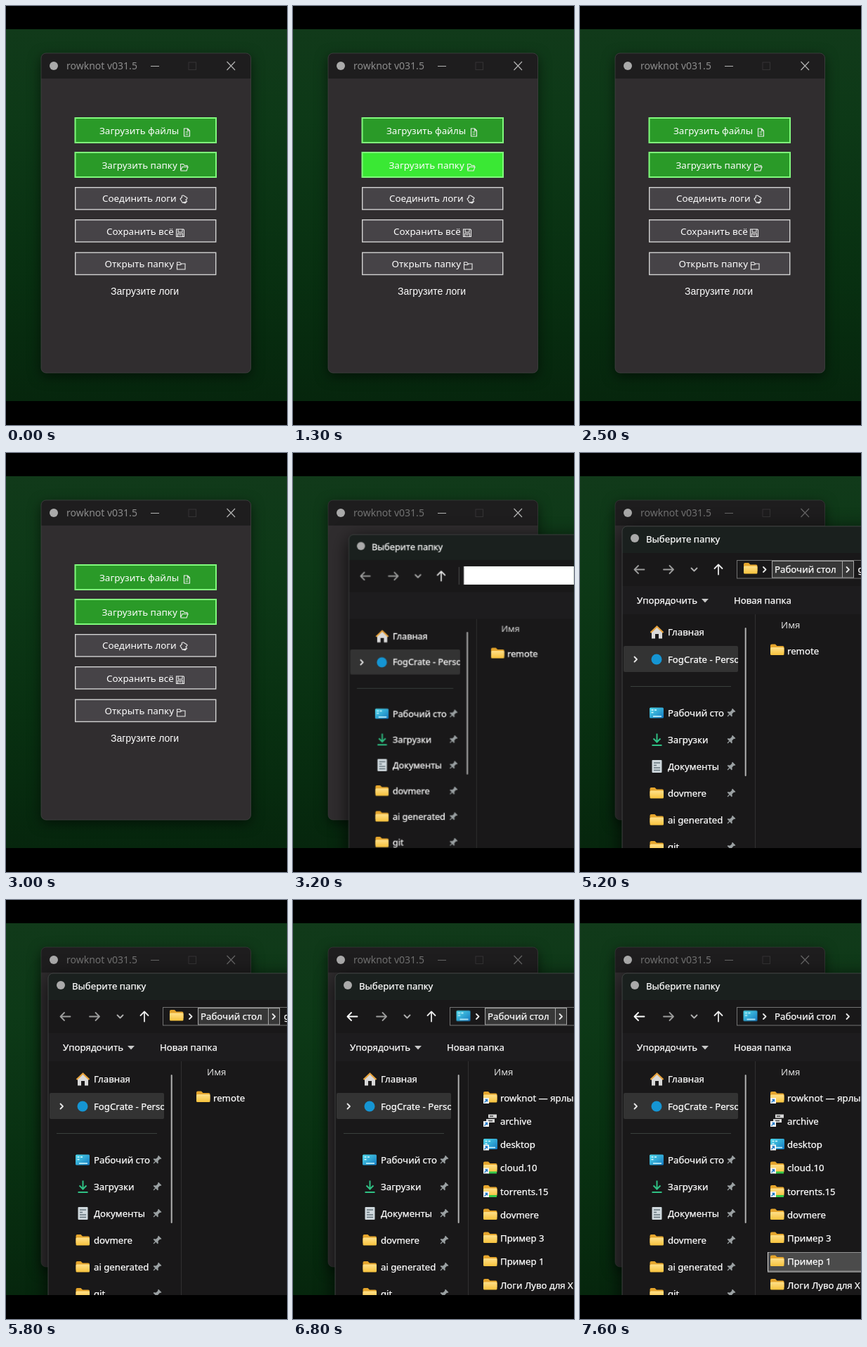
An HTML page for the animation above (8 s loop, 400 by 595 pixels).

```html
<!DOCTYPE html>
<html lang="ru">
<head>
<meta charset="utf-8">
<title>Выбор папки</title>
<style>
html, body { margin: 0; width: 100%; height: 100%; overflow: hidden; background: #000; }
svg { display: block; }
.stage { width: 400px; height: 595px; }
text { font: 13.2px "Noto Sans", "Open Sans", sans-serif; fill: #fff; white-space: pre; }
.dialog text { stroke: #fff; stroke-width: .25; }
.title { font-size: 14px; fill: #8c8c8c; }
.button text { font-size: 13.4px; fill: #fff; }
.status { font: 14px "Liberation Sans", Arial, sans-serif; fill: #fff; }
.line { fill: none; stroke: #ececec; stroke-width: 1.1; }
.arrow { fill: none; stroke: #e8e8e8; stroke-width: 1.8; stroke-linecap: round; stroke-linejoin: round; }
.green { fill: #2a9a28; stroke: #80fb7c; stroke-width: 2; }
.gray { fill: #464347; stroke: #d2d2d2; stroke-width: 1.4; }
.window-shadow { filter: drop-shadow(0 5px 9px rgba(0,0,0,.55)); }
.dialog-shadow { filter: drop-shadow(0 6px 14px rgba(0,0,0,.8)); }

.timed { animation: 8s step-end infinite; }
.dialog { transform-origin: 545px 397px; animation-name: open; }
.title { animation-name: title; }
.frame { animation-name: frame; }
.controls { animation-name: controls; }
.files { animation-name: files; }
.folder { animation-name: folder; }
.loading { animation-name: loading; }
.loaded { animation-name: loaded; }
.header { animation-name: header; }
.crumb { animation-name: crumb; }
.before { animation-name: before; }
.after { animation-name: after; }
.back { animation-name: back; }
.row { animation-name: row; }

@keyframes title { 0% { fill: #8c8c8c } 40% { fill: #727272 } }
@keyframes frame { 0% { stroke-opacity: .75 } 40% { stroke-opacity: .5 } }
@keyframes controls { 0% { stroke: #b4b4b4 } 65% { stroke: #666 } }
@keyframes files { 0% { fill: #2a9a28 } 7.5% { fill: #3ae834 } 13.75% { fill: #2a9a28 } }
@keyframes folder { 0% { fill: #2a9a28 } 13.75% { fill: #3ae834 } 25% { fill: #2a9a28 } }
@keyframes open {
  0% { opacity: 0; transform: scale(.96) }
  40% { opacity: 1; transform: scale(.96) }
  41.25% { opacity: 1; transform: none }
}
@keyframes loading { 0% { opacity: 1 } 42.5% { opacity: 0 } }
@keyframes loaded { 0% { opacity: 0 } 42.5% { opacity: 1 } }
@keyframes header { 0% { opacity: 0 } 48.75% { opacity: 1 } 53.75% { opacity: 0 } }
@keyframes crumb { 0% { opacity: 0 } 55% { opacity: 1 } 90% { opacity: 0 } }
@keyframes before { 0% { opacity: 1 } 80% { opacity: 0 } }
@keyframes after { 0% { opacity: 0 } 80% { opacity: 1 } }
@keyframes back { 0% { stroke: #9c9c9c } 80% { stroke: #fff } }
@keyframes row {
  0% { opacity: 0; transform: none }
  91.25% { opacity: 1; transform: none }
  92.5% { opacity: 1; transform: translateY(66.4px) }
  93.75% { opacity: 1; transform: translateY(166px) }
  95% { opacity: 1; transform: translateY(232.5px) }
}
</style>
</head>
<body>
<svg class="stage" viewBox="0 0 400 595">
  <defs>
    <linearGradient id="wall" x1="0" y1="0" x2="0" y2="1">
      <stop offset="0" stop-color="#113a1a"/>
      <stop offset=".25" stop-color="#0d3917"/>
      <stop offset=".65" stop-color="#083011"/>
      <stop offset="1" stop-color="#06260d"/>
    </linearGradient>
    <linearGradient id="yellow" x1="0" y1="0" x2="0" y2="1">
      <stop offset="0" stop-color="#ffe08a"/>
      <stop offset="1" stop-color="#f7c23c"/>
    </linearGradient>
    <linearGradient id="blue" x1="0" y1="0" x2="1" y2="1">
      <stop offset="0" stop-color="#4fd8ea"/>
      <stop offset="1" stop-color="#1478c0"/>
    </linearGradient>
    <clipPath id="view"><rect y="33" width="400" height="528"/></clipPath>
    <clipPath id="cloudClip"><rect x="120" y="276" width="105" height="34"/></clipPath>
    <clipPath id="deskClip"><rect x="120" y="354" width="85" height="30"/></clipPath>

    <!-- icons are centred on their own origin -->
    <g id="dir">
      <path d="M-10-6q0-2 2-2h5l2.500 2.500H7.500q2 0 2 2V4H-10z" fill="#e5a52c"/>
      <rect x="-10" y="-3.500" width="19.500" height="11" rx="1.500" fill="url(#yellow)"/>
    </g>
    <g id="desktop">
      <rect x="-10" y="-7.500" width="20" height="15" rx="1.500" fill="url(#blue)"/>
      <path d="M-7.500-4h3M-7.500-.5h3M-3-4h3M-5 5H7" stroke="#d5faff" stroke-width="1.700"/>
    </g>
    <g id="shortcut">
      <rect x="-10" y="1" width="8" height="8" fill="#f5f5f5"/>
      <path d="M-8.500 7.500l4-4m-3 0h3v3" fill="none" stroke="#1676c6" stroke-width="1.300"/>
    </g>
    <g id="greenDir">
      <use href="#dir"/><path d="M-3 7.500H9" stroke="#35c94b" stroke-width="3"/><use href="#shortcut"/>
    </g>
    <g id="pin" transform="rotate(45)">
      <path d="M-3-6h6v1.500l-1 .8V0l2.500 2v1.200h-9V2L-2 0v-3.700l-1-.8z" fill="#9aa0a2"/>
      <path d="M0 3v4" stroke="#9aa0a2" stroke-width="1.300"/>
    </g>
    <path id="chevron" class="arrow" d="M-2-3.500L1.500 0L-2 3.500"/>
    <path id="left" d="M7 0H-7m5.500-5.500L-7 0l5.500 5.500"/>
  </defs>

  <rect width="400" height="595"/>
  <g clip-path="url(#view)">
    <rect y="33" width="400" height="528" fill="url(#wall)"/>

    <!-- main window -->
    <rect class="window-shadow" x="50" y="67" width="298.500" height="454" rx="7" fill="#302d2f"/>
    <path d="M50 103V74q0-7 7-7h284.500q7 0 7 7v29z" fill="#1e1d1e"/>
    <rect class="timed frame" x="50" y="67" width="298.500" height="454" rx="7" fill="none" stroke="#454545"/>
    <circle cx="68" cy="85" r="6" fill="#aaa"/>
    <text class="timed title" x="86" y="90">rowknot v031.5</text>
    <path class="timed controls" d="M206 85.500h12M314.500 79l11.500 12m0-12l-11.500 12" fill="none" stroke-width="1.200"/>
    <rect x="260" y="80" width="10.500" height="10.500" fill="none" stroke="#343334"/>

    <g class="button">
      <rect class="green timed files" x="98.500" y="159" width="200.500" height="35"/>
      <text x="133" y="182">Загрузить файлы</text>
      <path class="line" d="M253.500 174h5l3 3v8h-8zM255.500 179h4m-4 3h4M258.500 174v3h3"/>

      <rect class="green timed folder" x="98.500" y="208" width="200.500" height="35"/>
      <text x="136.500" y="231">Загрузить папку</text>
      <path class="line" d="M248.500 233.500v-9h4l1.500 2h4v2M248.500 233.500l2.500-5h8l-2 5.500h-8.500"/>

      <rect class="gray" x="98.700" y="257.700" width="200" height="31.300"/>
      <text x="137" y="278">Соединить логи</text>
      <path class="line" d="M248 274l2.500-2.500q-1-3 2-2.500l2.500 1.500 3 2q0 2-2 2.500l1.500 2.500-2.500 2.500-2-1.500q-2 2-2.500-.5zM253 280l3-2.500"/>

      <rect class="gray" x="98.700" y="303.700" width="200" height="31.300"/>
      <text x="143" y="325">Сохранить всё</text>
      <path class="line" d="M242.500 317h10l1 1v9.500h-11zM245 317v4h6v-4M244.500 327v-4h7v4M246 325h4"/>

      <rect class="gray" x="98.700" y="350.200" width="200" height="31.300"/>
      <text x="140.500" y="371">Открыть папку</text>
      <path class="line" d="M243.500 374v-10h4l1.500 2h6v8zM243.500 367.500h5l1.500-1.500"/>
    </g>
    <text class="status" x="149" y="409.500">Загрузите логи</text>

    <!-- folder picker -->
    <g class="timed dialog">
      <rect class="dialog-shadow" x="60" y="104" width="970" height="590" rx="7" fill="#191819"/>
      <path d="M60 142v-31q0-7 7-7h960v38z" fill="#1a201e"/>
      <path d="M60 189h960v40H60z" fill="#1d1c1e"/>
      <rect x="60" y="104" width="970" height="590" rx="7" fill="none" stroke="#4a4d4b" stroke-opacity=".8"/>
      <circle cx="78" cy="121" r="6" fill="#aaa"/>
      <text x="94" y="127">Выберите папку</text>

      <g transform="translate(84.500 165.500)"><use href="#left" class="arrow timed back"/></g>
      <use href="#left" class="arrow" style="stroke:#9c9c9c" transform="translate(126 165.500) scale(-1 1)"/>
      <path class="arrow" style="stroke:#b0b0b0" d="M158.500 163.500l4 4 4-4"/>
      <use href="#left" class="arrow" transform="translate(197 165.500) rotate(90)"/>

      <g class="timed loading">
        <path d="M223.500 152v26" stroke="#4a4a4a"/>
        <rect x="230.500" y="151" width="780" height="27" fill="#fff"/>
      </g>
      <g class="timed loaded">
        <rect x="223.500" y="152.500" width="780" height="25.500" fill="#191819" stroke="#737373"/>
        <g class="timed crumb">
          <rect x="273.500" y="153.500" width="116" height="23.500" fill="#373737" stroke="#a5a5a5"/>
          <path d="M373.500 153.500V177" stroke="#a5a5a5"/>
        </g>
        <g class="timed before">
          <use href="#dir" x="243" y="164"/>
          <text x="395.500" y="170">git</text>
        </g>
        <use class="timed after" href="#desktop" x="242.500" y="164.500"/>
        <use href="#chevron" x="263" y="165.500"/>
        <text x="277" y="170">Рабочий стол</text>
        <use href="#chevron" x="381.500" y="165.500"/>
        <text x="81" y="214">Упорядочить</text>
        <path d="M173 207h10l-5 5.500z" fill="#c8c8c8"/>
        <text x="219" y="214">Новая папка</text>
      </g>

      <!-- sidebar -->
      <rect x="62" y="274" width="163" height="37" rx="2" fill="#333"/>
      <path d="M72 331.500h143" stroke="#3a403d"/>
      <path d="M249.500 229v400" stroke="#303030"/>
      <path d="M235.700 249v209" stroke="#b2b2b2" stroke-width="2" stroke-linecap="round"/>
      <path d="M102 253v10.500h5V257h5v6.500h5V253l-7.500-6.500z" fill="#d9d9d9"/>
      <path d="M100.500 255l9-8.500 9 8.500" fill="none" stroke="#e8a33c" stroke-width="2.200"/>
      <text x="125" y="259">Главная</text>
      <use href="#chevron" x="79.500" y="293"/>
      <circle cx="109" cy="293" r="7.500" fill="#1595d3"/>
      <text x="125" y="297.500" clip-path="url(#cloudClip)">FogCrate - Personal</text>

      <use href="#desktop" x="109" y="369"/>
      <text x="125" y="374" clip-path="url(#deskClip)">Рабочий стол</text>
      <path d="M109.500 398.500v12m-5-5l5 5 5-5M102.500 415h14" fill="none" stroke="#2fc084" stroke-width="2"/>
      <text x="125" y="412">Загрузки</text>
      <rect x="102.500" y="436" width="14" height="18" rx="1" fill="#cfd8dd"/>
      <path d="M105 440h9m-9 3.500h4m-4 3.500h9m-9 3.500h9" stroke="#66747c" stroke-width="1.400"/>
      <text x="125" y="450">Документы</text>
      <use href="#dir" x="109.500" y="483"/>
      <text x="125" y="488">dovmere</text>
      <use href="#dir" x="109.500" y="521"/>
      <text x="125" y="526">ai generated</text>
      <use href="#dir" x="109.500" y="559"/>
      <text x="125" y="564">git</text>
      <use href="#pin" x="215" y="369"/>
      <use href="#pin" x="215" y="407"/>
      <use href="#pin" x="215" y="445"/>
      <use href="#pin" x="215" y="483"/>
      <use href="#pin" x="215" y="521"/>
      <use href="#pin" x="215" y="559"/>

      <!-- file list -->
      <rect class="timed header" x="250" y="229" width="400" height="30" fill="#414141"/>
      <text x="286" y="248.500" style="fill:#dcdcdc;stroke:none">Имя</text>
      <g class="timed before">
        <use href="#dir" x="281" y="279.500"/>
        <text x="295" y="285.500">remote</text>
      </g>
      <g class="timed after">
        <rect class="timed row" x="267.500" y="267.500" width="500" height="27.500" fill="#4b4b4b" stroke="#dcdcdc"/>
        <use href="#dir" x="281" y="280"/><use href="#shortcut" x="281" y="280"/>
        <text x="295" y="285.500">rowknot — ярлык</text>
        <path d="M278 304.500h12v5h-12zM275 311h12v5h-12z" fill="#d8d8d8"/>
        <path d="M280 307h5m-7 6.500h6" stroke="#444" stroke-width="1.500"/>
        <use href="#shortcut" x="281" y="313"/>
        <text x="295" y="319">archive</text>
        <use href="#desktop" x="281" y="346.500"/><use href="#shortcut" x="281" y="346.500"/>
        <text x="295" y="352">desktop</text>
        <use href="#greenDir" x="281" y="379.500"/>
        <text x="295" y="385">cloud.10</text>
        <use href="#greenDir" x="281" y="413"/>
        <text x="295" y="418.500">torrents.15</text>
        <use href="#dir" x="281" y="446.500"/>
        <text x="295" y="452">dovmere</text>
        <use href="#dir" x="281" y="479.500"/>
        <text x="295" y="485">Пример 3</text>
        <use href="#dir" x="281" y="512.500"/>
        <text x="295" y="518">Пример 1</text>
        <use href="#dir" x="281" y="546"/>
        <text x="295" y="551.500">Логи Луво для X</text>
      </g>
    </g>
  </g>
</svg>
</body>
</html>
```
